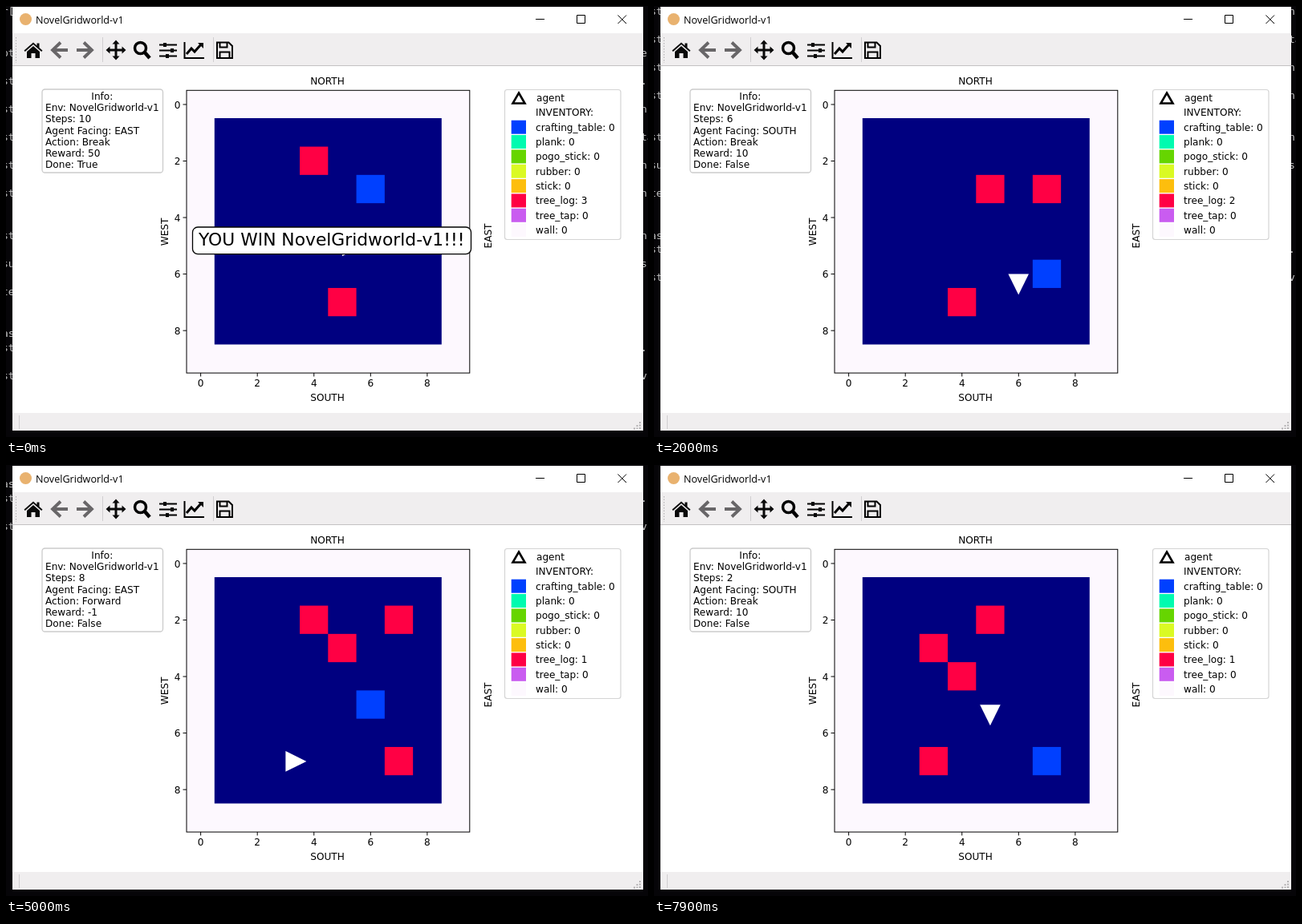
Animation, 800 px wide and 538 px high, one loop 8 s. Source, as an HTML page:

```html
<!DOCTYPE html>
<html lang="en">
<head>
<meta charset="utf-8">
<title>NovelGridworld-v1</title>
<style>
html, body { margin: 0; width: 100%; height: 100%; overflow: hidden; background: #060508; }
svg { display: block; font: 12.1px "DejaVu Sans", sans-serif; }
text { white-space: pre; }
.mid { text-anchor: middle; }
.end { text-anchor: end; }
.line { fill: none; stroke: #000; }
#term { font: 13px "DejaVu Sans Mono", monospace; fill: #c4c4c4; }
</style>
</head>
<body>
<svg width="800" height="538" viewBox="0 0 800 538">
  <rect width="800" height="538" fill="#060508"/>
  <g id="term"></g>

  <!-- window -->
  <rect x="8" y="1" width="786" height="529" fill="#fff"/>
  <rect x="8" y="34" width="786" height="41" fill="#f0eeef"/>
  <path d="M8 74.5H794" stroke="#c4c2c3"/>
  <rect x="8" y="508" width="786" height="22" fill="#f0eeef"/>
  <path d="M16.5 511V528M120.5 39V70M258.5 39V70" stroke="#d0ced0"/>
  <path d="M12.5 39V71" stroke="#b0aeb0" stroke-dasharray="1.5 2"/>
  <path d="M790 519v9M786.5 523v5M783 526.500v2" stroke="#b4b2b4" stroke-width="2" stroke-dasharray="2 1.500"/>
  <circle cx="24.500" cy="16.500" r="7.500" fill="#e9b26f"/>
  <text x="37" y="21.500" style="font:12.6px 'Open Sans','Noto Sans',sans-serif">NovelGridworld-v1</text>
  <path class="line" d="M660 16.500H671M711.500 11.500h10v10h-10zM762.500 11.500l10.500 10.500m0-10.500l-10.500 10.500"/>

  <!-- toolbar -->
  <g fill="#0a0a0a">
    <path d="M22.500 55.500L34 45.500l4.500 4V46.500h3v5.500l4 3.500-1.300 1.500L34 48 23.800 57z"/>
    <path d="M26 57l8-7 8 7v8h-5.500v-6h-5v6H26z"/>
  </g>
  <path id="arrow" d="M68 45.500L58 55l10 9.500M59 55H77" fill="none" stroke="#686668" stroke-width="3.800"/>
  <use href="#arrow" transform="matrix(-1 0 0 1 165 0)"/>
  <path d="M137 45V65M127 55H147" stroke="#0a0a0a" stroke-width="3"/>
  <path d="M137 42.500l4.500 5h-9zM137 67.500l4.500-5h-9zM124.500 55l5-4.500v9zM149.500 55l-5-4.500v9z" fill="#0a0a0a"/>
  <g class="line" stroke-width="3.500">
    <circle cx="167.500" cy="52.500" r="7"/>
    <path d="M172.500 57.500l6.500 7.500" stroke-width="4.500"/>
  </g>
  <path class="line" d="M191 48.500H213M191 55.500H213M191 62.500H213" stroke-width="2"/>
  <path d="M196 46h4v5h-4zM205 53h4v5h-4zM199 60h4v5h-4z" fill="#0a0a0a"/>
  <path class="line" d="M222.500 45V65H247" stroke-width="2"/>
  <path class="line" d="M225 60l6-7 4 4 8-9" stroke-width="3"/>
  <path d="M239 46h7v7z" fill="#0a0a0a"/>
  <path class="line" d="M263 45.500h14.500l4.500 4.500v15h-19zM266.500 65v-7.500h12V65M266.500 46v5.500h9V46" stroke-width="2"/>

  <!-- info panel -->
  <rect x="45" y="104" width="150.500" height="104" rx="3.500" fill="#fff" stroke="#cbcbcb" stroke-width="1.300"/>
  <text class="mid" x="119.800" y="117">Info:</text>
  <g id="info"></g>

  <!-- legend -->
  <rect x="621.500" y="104.500" width="144.500" height="187" rx="3" fill="#fff" stroke="#d4d4d4" stroke-width="1.200"/>
  <path class="line" d="M639 108.500L646.500 121.500H631.500z" stroke-width="2.600"/>
  <text x="661" y="119">agent</text>
  <text x="660" y="137.300">INVENTORY:</text>
  <g id="legend"></g>

  <!-- plot -->
  <rect x="225" y="105.300" width="352.800" height="352.800" fill="#fdf8fe"/>
  <rect x="259.800" y="140" width="283" height="282.500" fill="#000080"/>
  <g id="cells"></g>
  <path id="agent" d="M-12.800 0L0-26 12.800 0z" fill="#fff"/>
  <rect class="line" x="225" y="105.300" width="352.800" height="352.800"/>
  <g id="ticks"></g>
  <g class="mid">
    <text x="400.500" y="98">NORTH</text>
    <text x="400.500" y="493">SOUTH</text>
    <text transform="translate(201.500 282)rotate(-90)">WEST</text>
    <text transform="translate(604.500 287)rotate(-90)">EAST</text>
    <g id="win">
      <rect x="232.500" y="276" width="347" height="33.700" rx="6.500" fill="#fff" stroke="#000" stroke-width="1.300"/>
      <text x="405.700" y="299" font-size="21.800">YOU WIN NovelGridworld-v1!!!</text>
    </g>
  </g>
</svg>
<script>
const LOOP = 8000, CELL = 35.28, ROW = 17.5;
const $ = id => document.getElementById(id);
const FACING = ['NORTH', 'EAST', 'SOUTH', 'WEST'];
const STEP = [[0, -1], [1, 0], [0, 1], [-1, 0]];
const ACTION = { F: 'Forward', L: 'Left', R: 'Right', B: 'Break' };

// agent: column, row, facing; moves: one letter per step
const EPISODES = [
  { start: -9000, pace: 180, agent: [1, 7, 0], table: [6, 3], moves: 'FFRFBFBFFB',
    logs: [[4, 2], [5, 7], [3, 5], [4, 5], [6, 5]] },
  { start: 830, pace: 180, agent: [6, 5, 1], table: [7, 6], moves: 'LBRRFBFRFB',
    logs: [[5, 3], [7, 3], [6, 4], [4, 7], [6, 7]] },
  { start: 3610, pace: 160, agent: [2, 6, 0], table: [6, 5], moves: 'FRBRFFLFFFFBFLFFFFB',
    logs: [[4, 2], [7, 2], [5, 3], [7, 7], [3, 5]] },
  { start: 7450, pace: 170, agent: [5, 5, 1], table: [7, 7], moves: 'RB',
    logs: [[5, 2], [3, 3], [4, 4], [3, 7], [5, 6]] }
];

const ITEMS = [['crafting_table', '#0040ff'], ['plank', '#00fbb0'], ['pogo_stick', '#66d500'],
  ['rubber', '#dafa24'], ['stick', '#fdbe0d'], ['tree_log', '#ff0044'],
  ['tree_tap', '#c95cf0'], ['wall', '#fdf8fe']];

// console lines that stick out beside the window: rows above the last, left and right ends
const CONSOLE = [[0, 'st', 'v1'], [2, 'st', '.'], [3, 'as', ''], [6, 'te', ''], [8, 'su', 'su'],
  [10, 'st', 'n.'], [13, 'st', 'n'], [15, 'st', 'n'], [17, 'st', 'ta'], [19, 'st', 'n'],
  [21, 'st', '.'], [23, 'pt', 'e'], [26, 'r[', '']];

$('term').innerHTML = CONSOLE.map(([row, left, right]) => {
  const y = 465.5 - row * ROW;
  return `<text x="-5" y="${y}">${left}</text><text x="791" y="${y}">${right}</text>`;
}).join('');

$('legend').innerHTML = ITEMS.map(([name, color], i) => {
  const y = 142.7 + i * 18.35;
  return `<rect x="629.700" y="${y}" width="18.300" height="17" fill="${color}"/>
    <text x="660" y="${y + 12.8}">${name}: 0</text>`;
}).join('');
const logCount = $('legend').querySelectorAll('text')[5];

$('ticks').innerHTML = [0, 2, 4, 6, 8].map(n => {
  const x = 225 + (n + .5) * CELL, y = 105.3 + (n + .5) * CELL;
  return `<path class="line" d="M${x} 458v4.500M225 ${y}h-4.500"/>
    <text class="mid" x="${x}" y="475">${n}</text>
    <text class="end" x="217.500" y="${y + 4.6}">${n}</text>`;
}).join('');

const square = ([c, r], color) =>
  `<rect x="${224.9 + c * CELL}" y="${105 + r * CELL}" width="${CELL}" height="${CELL}" fill="${color}"/>`;

const stepsAt = (ep, t) => Math.min(ep.moves.length, Math.floor((t - ep.start) / ep.pace));

function play(ep, steps) {
  let [c, r, dir] = ep.agent, logs = ep.logs, reward = 0;
  for (const move of ep.moves.slice(0, steps)) {
    const [dx, dy] = STEP[dir];
    reward = -1;
    if (move === 'F') { c += dx; r += dy; }
    if (move === 'L') dir = (dir + 3) % 4;
    if (move === 'R') dir = (dir + 1) % 4;
    if (move === 'B') {
      logs = logs.filter(([x, y]) => x !== c + dx || y !== r + dy);
      reward = 10;
    }
  }
  const found = ep.logs.length - logs.length;
  return { c, r, dir, logs, found, done: found === 3, reward: found === 3 ? 50 : reward };
}

// one console line per reset and step, two more after a win
function linesPrinted(t) {
  return EPISODES.slice(1).filter(ep => ep.start <= t).reduce((sum, ep) => {
    const won = ep.moves.length > 2 && t >= ep.start + ep.moves.length * ep.pace + 130;
    return sum + stepsAt(ep, t) + 1 + (won ? 2 : 0);
  }, 0);
}

let shown;
function draw(t) {
  const ep = EPISODES.filter(e => e.start <= t).pop();
  const steps = stepsAt(ep, t), lines = linesPrinted(t);
  const key = [ep.start, steps, lines].join();
  if (key === shown) return;
  shown = key;

  const s = play(ep, steps);
  $('cells').innerHTML = s.logs.map(p => square(p, '#ff0044')).join('') + square(ep.table, '#0040ff');
  $('agent').setAttribute('transform',
    `translate(${224.9 + (s.c + .5) * CELL} ${105.3 + (s.r + .5) * CELL})rotate(${s.dir * 90})`);
  $('info').innerHTML = ['Env: NovelGridworld-v1', `Steps: ${steps}`, `Agent Facing: ${FACING[s.dir]}`,
    `Action: ${ACTION[ep.moves[Math.max(0, steps - 1)]]}`, `Reward: ${s.reward}`,
    `Done: ${s.done ? 'True' : 'False'}`
  ].map((line, i) => `<text x="49" y="${131.2 + i * 14.15}">${line}</text>`).join('');
  logCount.textContent = `tree_log: ${s.found}`;
  $('win').style.display = s.done ? '' : 'none';
  $('term').setAttribute('transform', `translate(0 ${-lines * ROW})`);
}

const origin = performance.now();
function tick() {
  draw((performance.now() - origin) % LOOP);
  requestAnimationFrame(tick);
}
tick();
</script>
</body>
</html>
```
